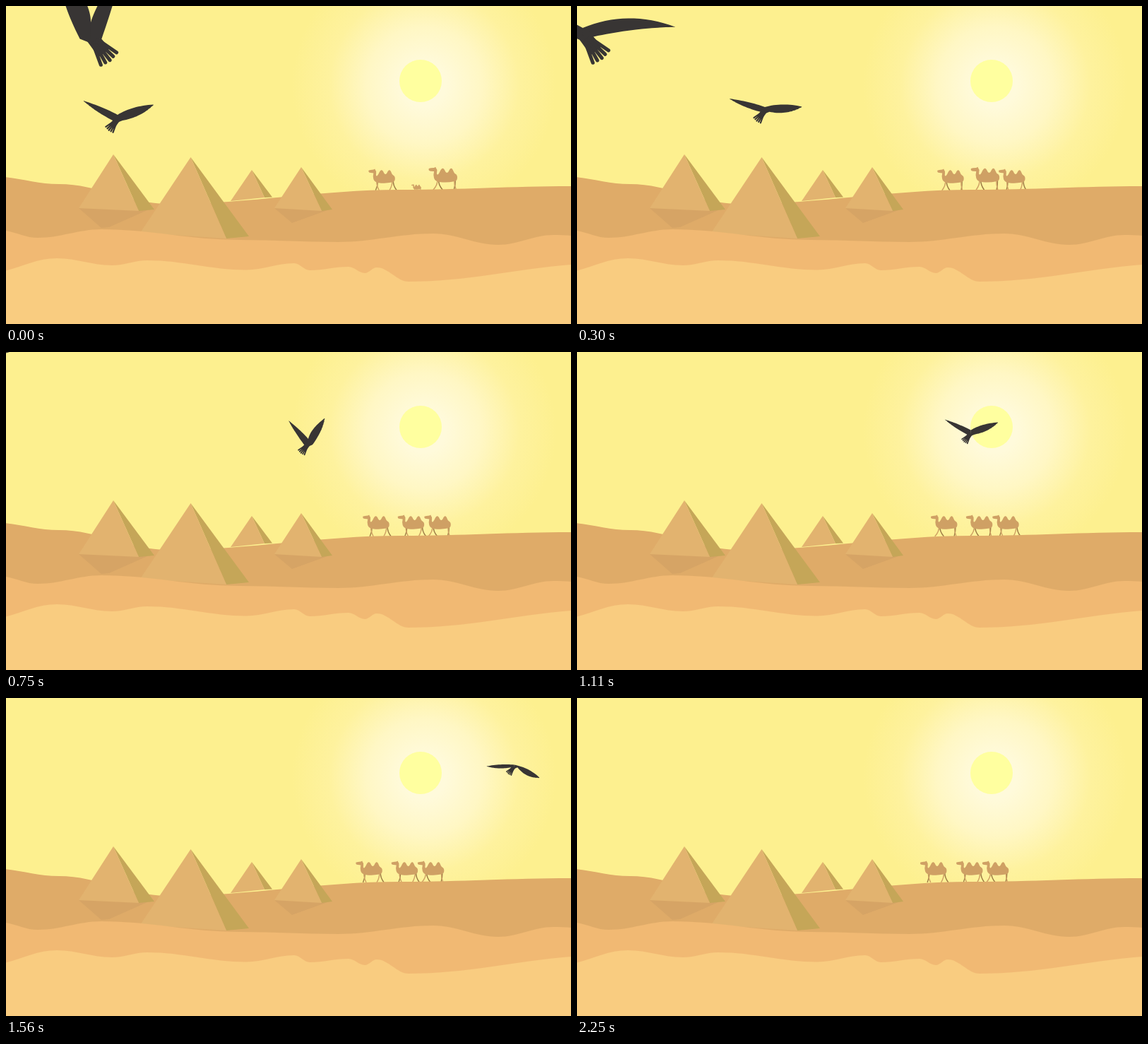
Recreate the animation shown at these times as an HTML page with a canvas. Size 800 by 450 pixels, loop 2280 ms.

```html
<!DOCTYPE html>
<html lang="en">
<head>
<meta charset="utf-8">
<title>Desert</title>
<style>
  html, body { margin: 0; width: 100%; height: 100%; overflow: hidden; }
  canvas { display: block; }
</style>
</head>
<body>
<canvas id="stage" width="800" height="450"></canvas>
<script>
const ctx = document.getElementById('stage').getContext('2d');
const LOOP = 2280, STEP = 30, FLAP = 555, STRIDE = LOOP / 3, DEG = Math.PI / 180;
const BIRD = '#383534', COAT = '#cfa064', FAR_LEG = '#9c7a45';
const wave = turns => Math.cos(turns * 2 * Math.PI);

function polygon(color, ...xy) {
  ctx.fillStyle = color;
  ctx.beginPath();
  for (let i = 0; i < xy.length; i += 2) ctx.lineTo(xy[i], xy[i + 1]);
  ctx.fill();
}

// Ridge easing from crest to trough, filled down to the bottom edge.
function dune(color, ...turns) {
  let [x, y] = turns[0];
  ctx.fillStyle = color;
  ctx.beginPath();
  ctx.moveTo(x, 450);
  ctx.lineTo(x, y);
  for (const [nextX, nextY] of turns.slice(1)) {
    const reach = (nextX - x) * 0.36;
    ctx.bezierCurveTo(x + reach, y, nextX - reach, nextY, nextX, nextY);
    [x, y] = [nextX, nextY];
  }
  ctx.lineTo(x, 450);
  ctx.fill();
}

function pyramid(apexX, apexY, leftX, leftY, midX, midY, rightX, rightY) {
  polygon('#c5a658', apexX, apexY, midX, midY, rightX, rightY);
  polygon('#e2b36f', apexX, apexY, leftX, leftY, midX, midY);
}

function sky() {
  ctx.fillStyle = '#fdf08f';
  ctx.fillRect(0, 0, 800, 450);
  const glow = ctx.createRadialGradient(592, 112, 30, 592, 112, 187);
  ['#fffadb', '#fff7c4', '#fef29e', '#fdf08f'].forEach((c, i) => glow.addColorStop(i / 3, c));
  ctx.fillStyle = glow;
  ctx.fillRect(400, 0, 400, 300);
  ctx.fillStyle = '#ffff9f';
  ctx.beginPath();
  ctx.arc(587, 106, 30, 0, 7);
  ctx.fill();
}

function land() {
  dune('#dfab68', [-20, 241], [75, 252], [230, 280], [560, 260], [800, 255]);
  polygon('#d6a465', 103, 286, 135, 314, 146, 313, 200, 289);
  polygon('#d6a465', 380, 286, 405, 307, 455, 289);
  pyramid(152, 210, 103, 286, 188, 290, 210, 288);
  pyramid(348, 232, 318, 276, 366, 271, 377, 270.5);
  pyramid(418, 228, 380, 286, 447, 290, 462, 288);
  pyramid(261.5, 214, 190, 321, 312, 329, 344, 326);
  dune('#f1b973', [-10, 317], [45, 328], [135, 316], [330, 331], [470, 334], [605, 322],
    [697, 338], [775, 324], [850, 328]);
  dune('#f9cc80', [-30, 379], [72, 357], [150, 367], [200, 360], [340, 373.5], [408, 364],
    [430, 374], [485, 369], [508, 378], [525, 370], [570, 390], [850, 364]);
}

const camelBody = new Path2D(`M0 2.5Q0 1 3 1L7 .6 9 -.4 9.6 1Q11.6 3 10.8 6Q10 10 12 9.4
  C14.5 8 15.5 1.3 18.5 1.3C21 1.3 21.5 7 24 7C26.5 7 27 1.3 29.5 1.3C32 1.3 32.5 7.5 35 8.5
  Q38 10 37.4 14.5Q37 18 33 18.6Q24 20.5 14 19.2Q8.5 18.5 7 14Q5.8 10 7 5.4L3 5Q0 5 0 2.5Z`);

function leg(color, hip, foot) {
  ctx.strokeStyle = color;
  ctx.lineWidth = 1.4;
  ctx.beginPath();
  ctx.moveTo(hip, 16);
  ctx.quadraticCurveTo(hip + (hip - foot) * 0.1, 23, foot, 30);
  ctx.stroke();
}

function popOut(u) {
  const v = Math.min(1, u) - 1;
  return 1 + 2.70158 * v ** 3 + 1.70158 * v ** 2;
}

// Each camel pops up at its own moment, then walks left, slowly speeding up.
function camel(t, x, start, phase) {
  const walked = (t - start) / 1000;
  const size = popOut((t - start) / 490);
  const swing = wave(t / STRIDE + phase);
  ctx.save();
  ctx.translate(x - 9 * walked - 0.9 * walked ** 2, 261 + (1 - size) * 4);
  ctx.scale(size, size);
  ctx.translate(-19, -30);
  leg(FAR_LEG, 13, 14.3 - 4.3 * swing);
  leg(FAR_LEG, 35, 36.5 + 3.5 * swing);
  leg(COAT, 11.5, 10.3 + 4.7 * swing);
  leg(COAT, 33.5, 32.8 - 3.3 * swing);
  ctx.fillStyle = COAT;
  ctx.fill(camelBody);
  ctx.restore();
}

// Point at u on the parabola from a to b that bends through m.
function bend(a, m, b, u) {
  return m.map((v, k) => {
    const control = 2 * v - (a[k] + b[k]) / 2;
    return a[k] * (1 - u) ** 2 + 2 * control * u * (1 - u) + b[k] * u * u;
  });
}

function wing(side, lift, { angle, swing, half, arch }) {
  const a = (angle + swing * lift) * DEG;
  const length = 55 - 5 * lift;
  const bow = arch * (1 - lift) / 2;
  const at = (along, up) => [
    length * along * Math.cos(a) - up * Math.sin(a),
    -length * along * Math.sin(a) - up * Math.cos(a)
  ];
  const notch = [0, -6 - 2.5 * lift], tip = at(1, 0), root = [7, 2];
  ctx.save();
  ctx.scale(side, 1);
  ctx.beginPath();
  for (let u = 0; u <= 1; u += 1 / 16) ctx.lineTo(...bend(notch, at(0.5, half + bow), tip, u));
  for (let k = 0; k <= 20; k++) {
    const [x, y] = bend(tip, at(0.57, bow - half), root, k / 20);
    const feather = k < 11 ? (k % 2) * 1.4 : 0;
    ctx.lineTo(x + feather * Math.cos(a), y - feather * Math.sin(a));
  }
  ctx.lineTo(-0.5, 5);
  ctx.fill();
  ctx.restore();
}

function bird(x, y, scale, lift, tailSide, left, right) {
  ctx.save();
  ctx.translate(x, y);
  ctx.scale(scale, scale);
  ctx.fillStyle = ctx.strokeStyle = BIRD;
  wing(-1, lift, left);
  wing(1, lift, right);
  ctx.scale(tailSide, 1);
  ctx.rotate(-38 * DEG);
  polygon(BIRD, -4, 1, 4, 1, 4.5, 14, -4.5, 14);
  ctx.lineCap = 'round';
  ctx.lineWidth = 2.3;
  for (let i = -2; i <= 2; i++) {
    ctx.beginPath();
    ctx.moveTo(i, 5);
    ctx.lineTo(i * 3.2, 20 - Math.abs(i) * 0.6);
    ctx.stroke();
  }
  ctx.restore();
}

const smallLeft = { angle: 27, swing: 29, half: 4, arch: 0 };
const smallRight = { angle: 20, swing: 48, half: 6.2, arch: 0 };
const largeLeft = { angle: 34, swing: 31, half: 6, arch: 4 };
const largeRight = { angle: 34, swing: 31, half: 3.8, arch: 4 };

function draw(t) {
  sky();
  camel(t, 538.5, -643, 0);
  camel(t, 581.4, -44, 0);
  camel(t, 622.2, -343, 0.5);
  land();
  bird(158 + 0.36 * t, 160 - 0.0404 * t, 1 - 0.00022 * t,
    wave((t - 135) / FLAP), -1, smallLeft, smallRight);
  bird(Math.max(120 - 0.373 * t, -114 - 0.005 * t), Math.max(34, 42 - 0.01 * t), 2.2,
    wave(t / FLAP), 1, largeLeft, largeRight);
}

const begin = performance.now();
function tick() {
  const t = (performance.now() - begin) % LOOP;
  draw(Math.floor(t / STEP) * STEP);
  requestAnimationFrame(tick);
}
tick();
</script>
</body>
</html>
```
